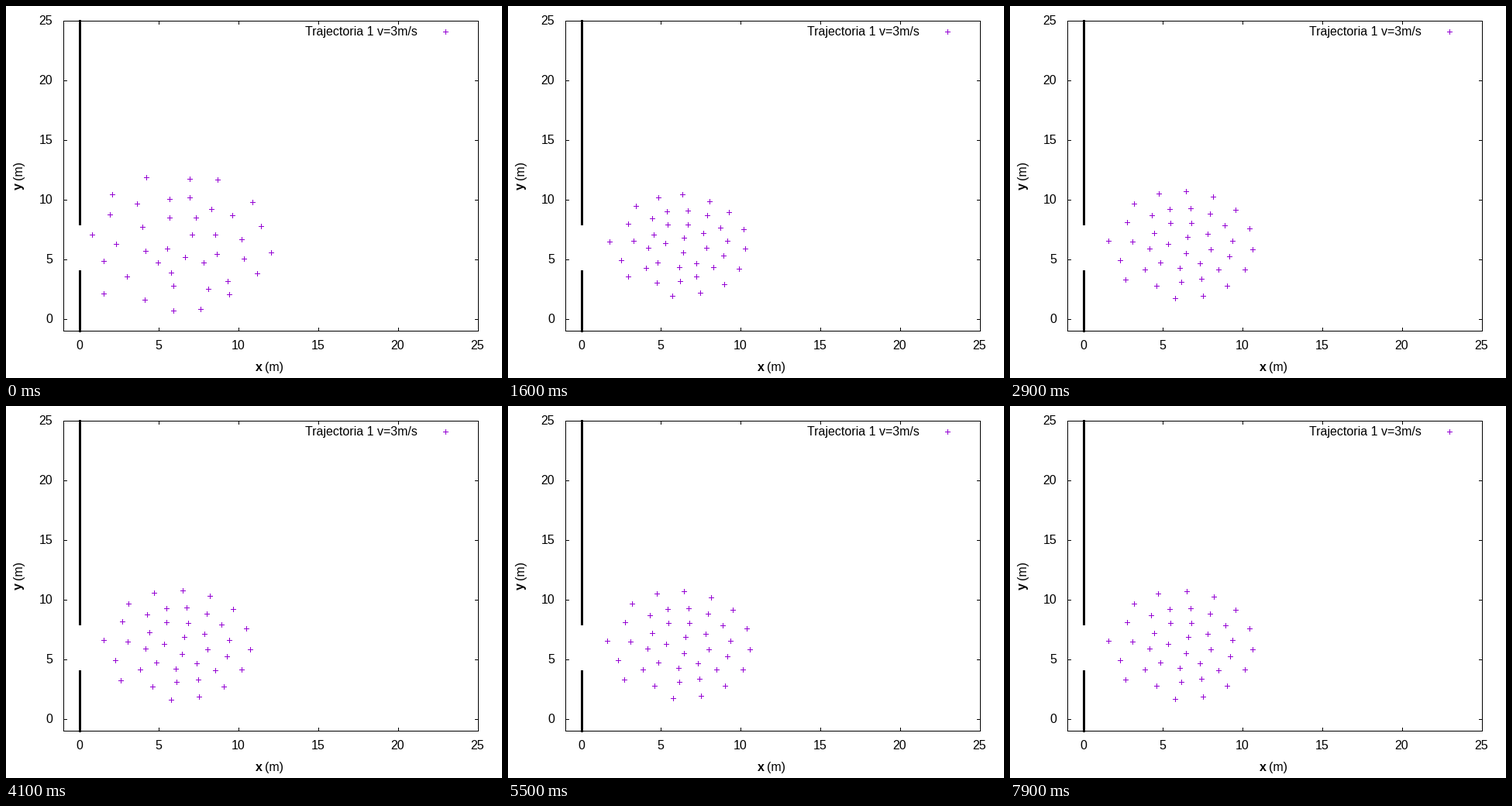
Animation of 640x480 px, one loop 8000 ms. Source, as a matplotlib script:

```python
import numpy as np
import matplotlib.pyplot as plt
from matplotlib.animation import FuncAnimation
from matplotlib.collections import PolyCollection
from matplotlib.patches import Rectangle

W, H, DPI = 640, 480, 80
FRAMES, STEP = 80, 100
LEFT, RIGHT, TOP, BOTTOM = 74, 609, 19, 419
SX, SY = (RIGHT - LEFT) / 26, (BOTTOM - TOP) / 26  # pixels per metre
CENTRE = np.array([6.1, 6.2])
PURPLE = "#9400d3"
PERIOD, DECAY, DELAY = 3000, 1300, 900

CROSS = np.array([(-3, 0), (0, 0), (0, -3), (1, -3), (1, 0), (4, 0),
                  (4, 1), (1, 1), (1, 4), (0, 4), (0, 1), (-3, 1)])


def angles(n, first):
    return first + 360 / n * np.arange(n)


def ring(r, deg):
    a = np.radians(deg)
    return np.column_stack([r * np.cos(a), r * np.sin(a)])


def packed_crowd():
    """Four rings; the third bulges into the gaps of the outermost."""
    outer = np.delete(angles(16, -4.6), [7, 9, 11])
    third = angles(15, 6.5)
    gap = np.abs((third[:, None] - outer + 180) % 360 - 180).min(axis=1)
    return np.vstack([
        ring(0.8, angles(3, 55)),
        ring(1.95, angles(9, 29)),
        ring(3.05 + 0.002 * gap ** 2, third),
        ring(4.53, outer),
    ])


rng = np.random.default_rng(4)
settled = packed_crowd()
spread = 0.25 * settled + rng.uniform(-0.45, 0.45, settled.shape)


def ringing(t):
    """Damped oscillation with a slow start: 1 at t = 0, then fading."""
    q = t * t / (t + DELAY)
    return np.exp(-q / DECAY) * np.cos(2 * np.pi * q / PERIOD)


def to_px(p):
    return np.column_stack([LEFT + (p[:, 0] + 1) * SX,
                            BOTTOM - (p[:, 1] + 1) * SY])


def positions(t):
    return np.rint(to_px(CENTRE + settled + spread * ringing(t)))


def crosses(points):
    return np.asarray(points)[:, None, :] + CROSS


fig = plt.figure(figsize=(W / DPI, H / DPI), dpi=DPI, facecolor="white")
ax = fig.add_axes([0, 0, 1, 1])
ax.set(xlim=(0, W), ylim=(H, 0))
ax.axis("off")


def box(x0, y0, x1, y1):
    """Fill the pixels x0..x1, y0..y1, both ends included."""
    ax.add_patch(Rectangle((x0, y0), x1 - x0 + 1, y1 - y0 + 1,
                           color="black", lw=0, antialiased=False))


def label(x, y, s, ha="left", **kw):
    ax.text(x, y, s, ha=ha, va="baseline", family="Liberation Sans",
            fontsize=16 * 72 / DPI, color="black", **kw)


def add_crosses(points):
    marks = PolyCollection(crosses(points), facecolor=PURPLE, lw=0,
                           antialiased=False, zorder=3)
    ax.add_collection(marks, autolim=False)
    return marks


for x in (LEFT, RIGHT):
    box(x, TOP, x, BOTTOM)
for y in (TOP, BOTTOM):
    box(LEFT, y, RIGHT, y)

for v in range(0, 26, 5):
    x = round(LEFT + (v + 1) * SX)
    y = round(BOTTOM - (v + 1) * SY)
    box(x, BOTTOM - 4, x, BOTTOM)
    box(x, TOP, x, TOP + 4)
    box(LEFT, y, LEFT + 4, y)
    box(RIGHT - 4, y, RIGHT, y)
    label(x - .5, 443, str(v), ha="center")
    label(60, y + 5, str(v), ha="right")

# Wall with a doorway.
box(94, 18, 96, 282)
box(94, 341, 96, 420)

label(322, 471, "x", weight="bold")
label(334, 471, "(m)")
label(21, 237, "y", weight="bold", rotation=90, rotation_mode="anchor")
label(21, 224, "(m)", rotation=90, rotation_mode="anchor")
label(386, 38, "Trajectoria 1 v=3m/s")

add_crosses([(567, 33)])
crowd = add_crosses(positions(0))


def draw(i):
    crowd.set_verts(crosses(positions(i * STEP)))
    return crowd,


anim = FuncAnimation(fig, draw, frames=FRAMES, interval=STEP,
                     repeat=True, repeat_delay=0)
plt.show()
```
